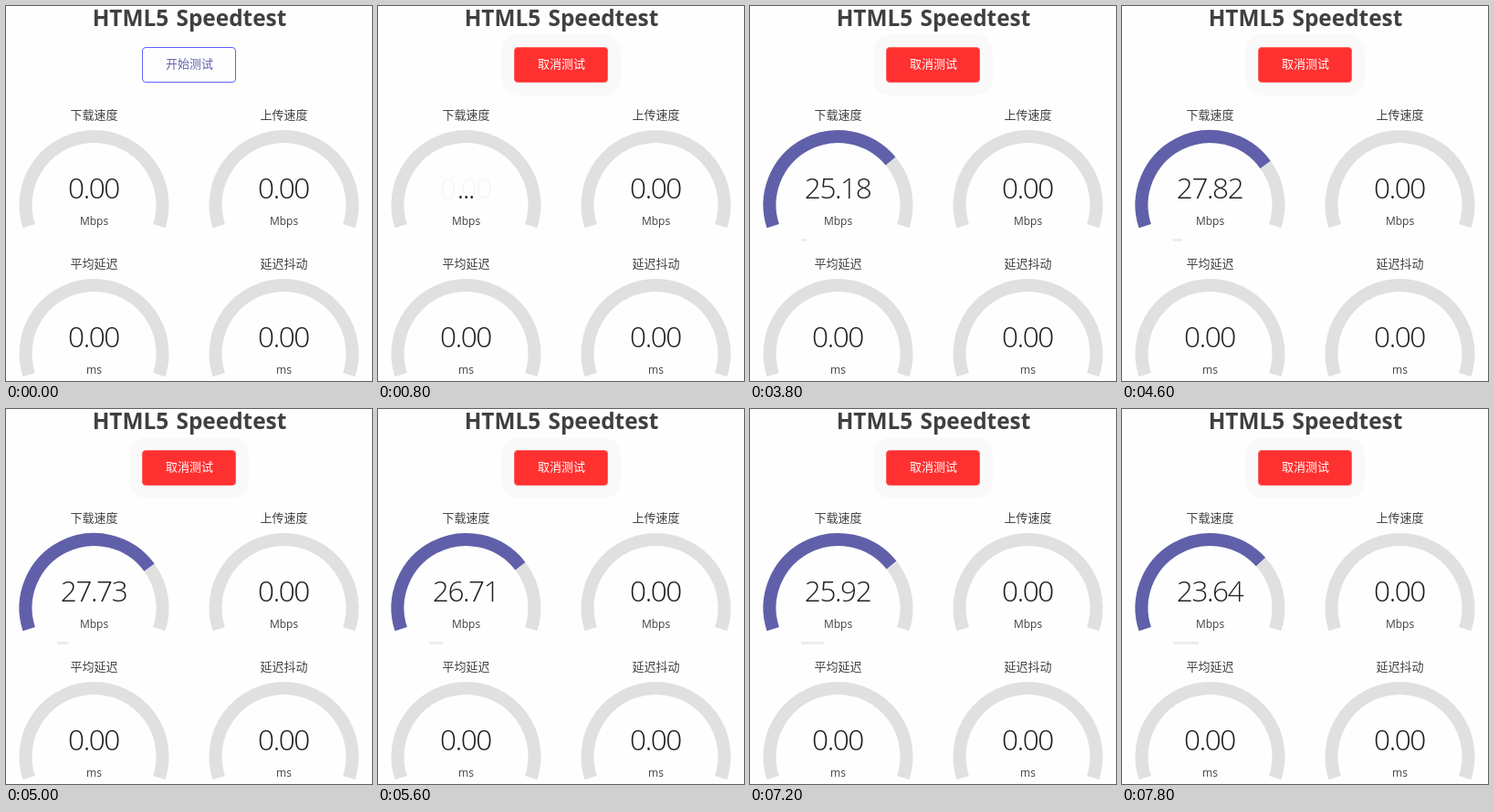
An HTML page for the animation above (8000 ms loop, 401 by 411 pixels).

```html
<!DOCTYPE html>
<html lang="zh">
<head>
<meta charset="utf-8">
<title>HTML5 Speedtest</title>
<style>
  html, body { margin: 0; width: 100%; height: 100%; overflow: hidden; background: #fefefe; }
  svg { display: block; width: 401px; height: 411px; }
  text { text-anchor: middle; font-family: "Open Sans", "Noto Sans", sans-serif; fill: #404040; }
  .heading { font-size: 24.4px; font-weight: 700; word-spacing: 2px; }
  .label { font: 13px "Noto Sans CJK SC", "Noto Sans CJK", sans-serif; }
  .value { font-size: 31.5px; font-weight: 350; letter-spacing: -1.4px; fill: #202020; }
  .ghost { fill: #f6f6f6; }
  .unit { font-size: 12px; }
  .track, .meter { fill: none; stroke-width: 14; }
  .track { stroke: #e0e0e0; }
  .meter { stroke: #6060aa; }
</style>
</head>
<body>
<svg id="stage" viewBox="0 0 401 411" xmlns="http://www.w3.org/2000/svg">
  <text class="heading" x="201" y="22">HTML5 Speedtest</text>
  <rect id="halo" x="135" y="31" width="131" height="67" rx="19" fill="#f9f9f9"/>
  <rect id="button" x="149.5" y="45.5" width="102" height="38" rx="3.5"/>
  <text id="caption" class="label" x="201" y="67.5"></text>
  <rect id="progress" x="56" y="255" height="3" fill="#ececec"/>
</svg>
<script>
const LOOP = 8000, TICK = 200;
const PRESS = 400, WAIT = 800, DOWNLOAD = 3000;
const RADIUS = 75;

// Download speed in Mbps, one reading per tick
const SPEEDS = [
  12.17, 17.26, 20.94, 23.41, 25.18, 26.35, 27.08, 27.55, 27.82, 27.96, 27.73, 27.40, 27.02,
  26.71, 26.53, 26.38, 26.27, 26.21, 26.18, 26.12, 26.04, 25.92, 24.86, 23.95, 23.64
];

const stage = document.getElementById('stage');
const [halo, button, caption, progress] =
  ['halo', 'button', 'caption', 'progress'].map(id => document.getElementById(id));

function setAttrs(node, attrs) {
  for (const key in attrs) node.setAttribute(key, attrs[key]);
}

function add(parent, tag, attrs, content = '') {
  const node = document.createElementNS(stage.namespaceURI, tag);
  setAttrs(node, attrs);
  node.textContent = content;
  parent.append(node);
  return node;
}

// The dial sweeps 216 degrees, from lower left to lower right
function arc(amount) {
  if (amount <= 0) return '';
  const point = a => {
    const angle = Math.PI * (1.2 * a - 1.1);
    return `${RADIUS * Math.cos(angle)} ${RADIUS * Math.sin(angle)}`;
  };
  const large = amount * 1.2 > 1 ? 1 : 0;
  return `M${point(0)}A${RADIUS} ${RADIUS} 0 ${large} 1 ${point(amount)}`;
}

function addGauge(x, y, label, unit) {
  const group = add(stage, 'g', { transform: `translate(${x} ${y})` });
  const write = (name, dx, dy, content) => add(group, 'text', { class: name, x: dx, y: dy }, content);
  add(group, 'path', { class: 'track', d: arc(1) });
  const meter = add(group, 'path', { class: 'meter' });
  write('label', 0, -94.5, label);
  const ghost = write('value ghost', -0.5, -7, '0.00');
  const value = write('value', -0.5, -7, '0.00');
  write('unit', 0, 22, unit);
  return { meter, ghost, value };
}

const download = addGauge(96.5, 218, '下载速度', 'Mbps');
addGauge(304.5, 218, '上传速度', 'Mbps');
addGauge(96.5, 381, '平均延迟', 'ms');
addGauge(304.5, 381, '延迟抖动', 'ms');

function drawButton(t) {
  const running = t >= PRESS;
  const fading = running && t < PRESS + TICK;
  setAttrs(halo, { visibility: running ? 'visible' : 'hidden' });
  setAttrs(button, {
    fill: fading ? '#ff7474' : running ? '#ff3030' : '#fefefe',
    stroke: fading ? '#c56080' : running ? '#ff6060' : '#6060ff'
  });
  caption.textContent = running ? '取消测试' : '开始测试';
  caption.style.fill = running ? '#fff' : '#6060aa';
  caption.style.fontWeight = running ? 500 : 400;
}

function drawDownload(t) {
  const measuring = t >= DOWNLOAD;
  const speed = measuring ? SPEEDS[(t - DOWNLOAD) / TICK] : 0;
  const waiting = t >= WAIT && !measuring;
  download.value.textContent = waiting ? '...' : speed.toFixed(2);
  setAttrs(download.ghost, { visibility: waiting ? 'visible' : 'hidden' });
  setAttrs(download.meter, { d: arc(1 - 1 / 1.3 ** Math.sqrt(speed)) });
  setAttrs(progress, { width: measuring ? 1 + (t - DOWNLOAD) * 0.0056 : 0 });
}

function render(time) {
  const t = Math.floor((time % LOOP) / TICK) * TICK;
  drawButton(t);
  drawDownload(t);
}

const start = performance.now();
function frame() {
  render(performance.now() - start);
  requestAnimationFrame(frame);
}
frame();
</script>
</body>
</html>
```
